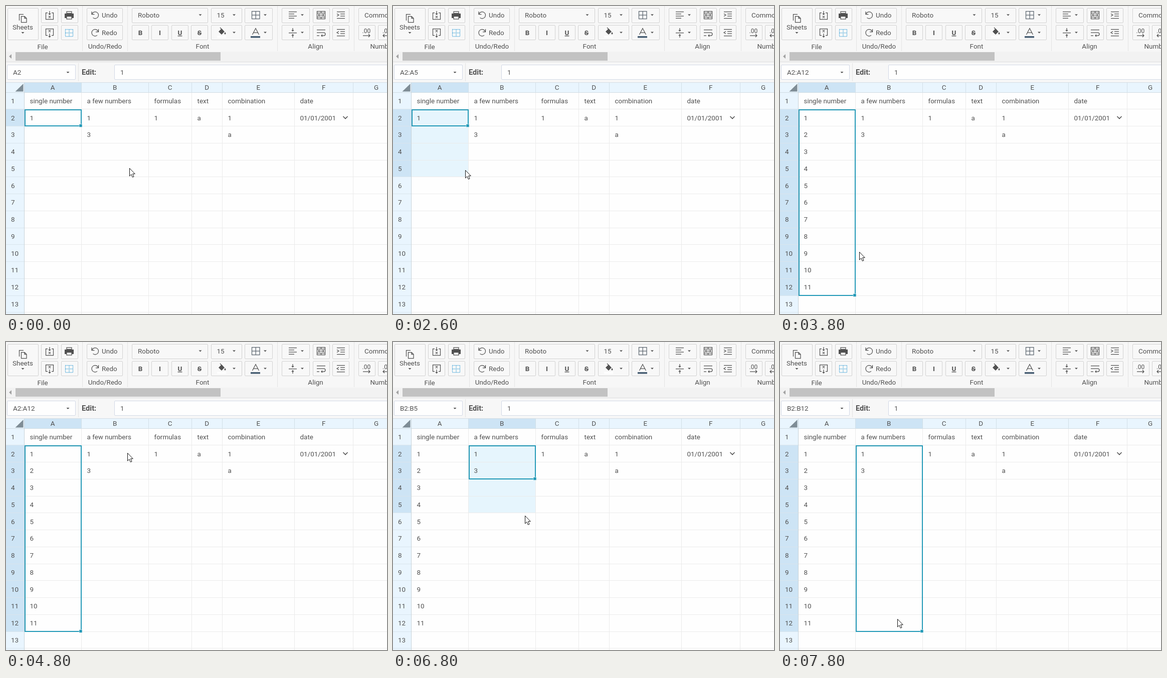
An HTML page for the animation above (8 s loop, 760 by 614 pixels).

```html
<!DOCTYPE html>
<html lang="en">
<head>
<meta charset="utf-8">
<title>Spreadsheet autofill</title>
<style>
html, body { margin: 0; width: 100%; height: 100%; overflow: hidden; background: #fefefe; }
svg { display: block; width: 760px; height: 614px; }
text { font: 13.45px Roboto, sans-serif; fill: #515151; white-space: pre; }
.mid { text-anchor: middle; }
.bold { font-weight: 600; }
.icon { fill: none; stroke: #505050; stroke-width: 1.25; }
.solid { fill: #505050; stroke: none; }
</style>
</head>
<body>
<svg id="stage" viewBox="0 0 760 614"></svg>
<script>
const STEP = 200, STEPS = 40;
const COLS = [36.5, 150.5, 284.5, 370.5, 431.5, 575.5, 692.5, 785.5];
const TOP = 172.5, PITCH = 33.75;
const rowY = row => Math.round(TOP + (row - 1) * PITCH);
const baseline = row => TOP + (row - 0.5) * PITCH + 4.6;
const TEAL = '#2299b7', HEAD = '#e9f5fe', HEAD_ON = '#cde4f5', SELECTED = '#e6f5fd';

const rect = (x, y, w, h, fill, extra = '') =>
  `<rect x="${x}" y="${y}" width="${w}" height="${h}" fill="${fill}" ${extra}/>`;
const text = (x, y, str, cls = '', extra = '') =>
  `<text x="${x}" y="${y}" class="${cls}" ${extra}>${str}</text>`;
const icon = (d, cls = 'icon', extra = '') => `<path d="${d}" class="${cls}" ${extra}/>`;
const line = (x1, y1, x2, y2, color) =>
  `<path d="M${x1} ${y1}L${x2} ${y2}" stroke="${color}" fill="none"/>`;
const caret = (x, y) => icon(`M${x - 3} ${y - 1.5}h6l-3 3z`, 'solid');
const button = (x, y, w, h = 29) =>
  rect(x + .5, y + .5, w, h, '#f8f8f8', 'rx="1.5" stroke="#d2d2d2"');
const field = (x, w) => rect(x + .5, 117.5, w, 29, '#fefefe', 'rx="1.5" stroke="#d2d9e6"');

function toolbar() {
  const undo = 'M171 11v5.5h5.5M171.5 16.2A6.7 6.7 0 1 1 173.5 23.4';
  const bars = (x, y, lengths) => lengths.map((n, i) => `M${x} ${y + i * 4.3}h${n}`).join('');
  const indent = y => `M660 ${y}h16M667 ${y + 4.3}h9M667 ${y + 8.6}h9M660 ${y + 13}h16`;
  const pairs = [70, 110, 612, 651].map(x => button(x, 4, 33) + button(x, 38, 33)).join('');
  const letters = [['B', 251], ['I', 290], ['U', 330], ['S', 369]];
  const letterStyle = {
    B: '', I: 'font-style="italic"',
    U: 'text-decoration="underline"', S: 'text-decoration="line-through"'
  };
  return rect(0, 0, 760, 91, '#f7f7f7') +
    [152.5, 242.5, 541.5, 694.5].map(x => line(x, 0, x, 90, '#e4e4e4')).join('') +
    button(3, 4, 61, 63) + pairs +
    button(161, 4, 71) + button(161, 38, 71) + button(251, 4, 151) +
    [4, 38].map(y => button(409, y, 61) + button(476, y, 55) + button(550, y, 55)).join('') +
    button(703, 4, 80) + button(703, 38, 33) + button(742, 38, 33) +

    icon('M26.5 29V16.5H35M30.5 20.5h6.5l4 4v8h-10.5zM37 20.5v4h4') +
    text(33.5, 47, 'Sheets', 'mid') + caret(33.5, 53.5) +
    icon('M83 13.5h-3.5v13h15v-13h-3.5M87 10v7M85 15l2 2 2-2M85 20l4 4m0-4l-4 4') +
    icon('M83 58.5h-3.5v-13h15v13h-3.5M87 55v7M85 60l2 2 2-2M85 48l4 4m0-4l-4 4') +
    icon('M121 11h10v3.5h-10z') + icon('M117 15h18v9h-18z', 'solid') +
    icon('M121 20.5h10v5.5h-10z', 'icon', 'style="fill:#f8f8f8"') +
    icon('M118.5 46.5h15v14h-15zM126 46.5v14M118.5 53.5h15', 'icon',
      'style="stroke:#58aedb" stroke-dasharray="2 1"') +

    icon(undo) + icon(undo, 'icon', 'transform="translate(355.5 35) scale(-1 1)"') +
    text(191, 22.5, 'Undo') + text(191, 57.5, 'Redo') +
    text(263, 23, 'Roboto') + text(420.5, 23, '15') +
    [[387.5, 18], [455, 18], [517, 18], [591, 18], [455, 53], [517, 53], [591, 53]]
      .map(p => caret(...p)).join('') +
    letters.map(([c, x]) => button(x, 38, 33) +
      text(x + 17, 58, c, 'mid bold', letterStyle[c])).join('') +

    icon('M490.5 10.5h15.5v15h-15.5zM498.2 10.5v15M490.5 18h15.5', 'icon',
      'style="stroke:#5c6670"') +
    icon('M424 51l6-6 6 6-6 6zM427 43l3 3M437 52q3 4 0 4.5-3-.5 0-4.5', 'solid') +
    icon('M427 43l5 5') + rect(421, 59.5, 18, 4, '#fefefe') +
    icon('M491.5 57L498 44.5 504.500 57M494 53h8') + rect(488, 60, 19, 3.5, '#4a6075') +

    icon(bars(564, 11.5, [16, 11, 16, 11])) +
    icon('M564 53.500h16M572 44v6M570 48l2 2 2-2M572 63v-6M570 59l2-2 2 2') +
    icon('M620.5 10.500h16v15h-16zM620.5 14h16M628.500 10.500v3.500M620.5 22h16M628.500 22v3.500' +
      'M623 18h11M625 16l-2 2 2 2M632 16l2 2-2 2') +
    icon('M620 47.500h17M620 53h14q3 0 3 3t-3 3h-5M631 57l-2 2 2 2M620 59h5') +
    icon(indent(11.5) + 'M660 15.500l4 2.500-4 2.500') +
    icon(indent(46.5) + 'M664 50.500l-4 2.500 4 2.500') +
    text(715, 23, 'Common') +
    text(710.5, 53.5, '.00', '', 'style="font-size:12px"') +
    text(751, 53.5, '.00', '', 'style="font-size:12px"') +
    icon('M712 59h14M723 56l3 3-3 3') + icon('M766 59h-14M755 56l-3 3 3 3') +

    [[73, 'File', 86], [197.5, 'Undo/Redo', 85], [392, 'Font', 85], [617.5, 'Align', 85]]
      .map(([x, s, y]) => text(x, y, s, 'mid')).join('') +
    text(726.5, 85, 'Number');
}

function editBar() {
  return rect(0, 91, 760, 20, '#f2f2f2') + rect(19, 92, 409, 17, '#c2c2c2') +
    icon('M6 100.5l5-4.500v9z', 'solid', 'style="fill:#a2a2a2"') +
    rect(0, 111, 760, 41, '#f7f7f7') + line(0, 111.5, 760, 111.5, '#dedede') +
    field(2, 136) + caret(123.5, 132.5) + line(144.5, 114, 144.5, 150, '#e2e2e2') +
    text(151, 137, 'Edit:', 'bold', 'style="font-size:14.6px"') +
    field(216, 560) + text(228, 137, '1');
}

function grid() {
  let out = line(0, 152.5, 760, 152.5, '#d5dde3') + line(0, 172.5, 760, 172.5, '#d0dce3');
  for (let row = 2; row <= 14; row++) {
    const y = rowY(row) - .5;
    out += line(0, y, 36, y, '#d9e5ed') + line(37, y, 760, y, '#ebebeb');
  }
  COLS.slice(1, 7).forEach(x => {
    out += line(x, 153, x, 173, '#d2dfe7') + line(x, 173, x, 614, '#ebebeb');
  });
  return out + line(36.5, 153, 36.5, 614, '#c8d3da') +
    icon('M34.500 155v15.500h-16z', 'solid', 'style="fill:#7f8d96"');
}

function labels() {
  const cell = (col, row, str) => text(COLS[col] + 11, baseline(row), str);
  let out = [...'ABCDEFG'].map((c, i) =>
    text((COLS[i] + COLS[i + 1]) / 2 - .3, 167, c, 'mid')).join('');
  for (let row = 1; row <= 13; row++) out += text(10, baseline(row), row);
  ['single number', 'a few numbers', 'formulas', 'text', 'combination', 'date']
    .forEach((s, col) => out += cell(col, 1, s));
  ['1', '1', '1', 'a', '1', '01/01/2001'].forEach((s, col) => out += cell(col, 2, s));
  out += cell(1, 3, '3') + cell(4, 3, 'a') + icon('M672.500 220l4.500 4.500 4.500-4.500', 'icon', 'style="stroke-width:1.6"');
  let filled = '';
  for (let row = 3; row <= 12; row++) filled += cell(0, row, row - 1);
  return out + `<g id="filled">${filled}</g>`;
}

const ARROW = 'M.5 .5V16L4 12.700 6.300 18.300 9 17.200 6.700 11.700H11.300Z';

const stage = document.getElementById('stage');
stage.innerHTML = rect(0, 0, 760, 614, '#fefefe') + toolbar() + editBar() +
  rect(0, 152, 760, 21, HEAD) + rect(0, 173, 36, 441, HEAD) +
  rect(0, 153, 0, 20, HEAD_ON, 'id="colOn"') +
  rect(0, rowY(2), 36, 0, HEAD_ON, 'id="rowOn"') +
  rect(0, rowY(2), 0, 0, SELECTED, 'id="range"') +
  grid() + labels() + text(14, 137, '', '', 'id="name"') +
  rect(0, 207, 0, 0, 'none', `id="outline" stroke="${TEAL}" stroke-width="2"`) +
  rect(0, 0, 6, 6, TEAL, 'id="handle"') +
  `<g id="pointer"><path id="arrow" d="${ARROW}" fill="#fff" stroke="#111"/>` +
  '<path id="cross" d="M-12 0H12M0 -12V12" stroke="#000" stroke-width="2.4"/></g>';

const part = Object.fromEntries([...stage.querySelectorAll('[id]')].map(e => [e.id, e]));
const set = (el, attrs) => Object.entries(attrs).forEach(([k, v]) => el.setAttribute(k, v));
const show = (el, on) => set(el, { visibility: on ? 'visible' : 'hidden' });

// [step, x, y]
const PATH = [
  [0, 246, 323], [2, 238, 313], [4, 190, 262], [6, 152, 238], [8, 148, 235], [10, 148, 236],
  [12, 146, 273], [14, 142, 380], [16, 135, 528], [17, 131, 555], [18, 136, 550],
  [20, 180, 430], [23, 238, 240], [24, 242, 221], [25, 242, 221], [26, 243, 228],
  [28, 246, 251], [29, 262, 262], [30, 282, 271], [31, 282, 272], [32, 281, 288],
  [34, 263, 346], [37, 240, 532], [38, 235, 553], [39, 234, 552]
];

// col/last: active range; box: outlined column and last row; no last means dragging
const PHASES = [
  { from: 0, col: 0, last: 2, box: [0, 2] },
  { from: 11, col: 0, box: [0, 2] },
  { from: 18, col: 0, last: 12, box: [0, 12] },
  { from: 19, col: 0, last: 12, box: [0, 12], filled: true },
  { from: 26, col: 1, box: [0, 12], filled: true },
  { from: 29, col: 1, last: 3, box: [1, 3], filled: true },
  { from: 32, col: 1, box: [1, 3], filled: true },
  { from: 39, col: 1, last: 12, box: [1, 12], filled: true }
];

function pointerAt(step) {
  const i = PATH.findLastIndex(p => p[0] <= step);
  const [s0, x0, y0] = PATH[i], [s1, x1, y1] = PATH[i + 1] || [s0 + 1, x0, y0];
  const k = (step - s0) / (s1 - s0);
  return [Math.round(x0 + (x1 - x0) * k), Math.round(y0 + (y1 - y0) * k)];
}

function draw(step) {
  const [x, y] = pointerAt(step);
  const { col, last, box: [boxCol, boxLast], filled } = PHASES.findLast(p => p.from <= step);
  const dragRow = Math.floor((y - 8 - TOP) / PITCH) + 1;
  const end = last || Math.min(12, Math.max(2, dragRow));
  const left = COLS[col] + .5, width = COLS[col + 1] - COLS[col];
  const height = rowY(end + 1) - rowY(2);
  const letter = 'AB'[col];

  part.name.textContent = `${letter}2` + (end > 2 ? `:${letter}${end}` : '');
  set(part.colOn, { x: left, width });
  set(part.rowOn, { height });
  set(part.range, { x: left, width, height });
  show(part.range, !last);
  show(part.filled, filled);

  const right = COLS[boxCol + 1] - .5, bottom = rowY(boxLast + 1) - 1;
  const boxLeft = COLS[boxCol] + 1.5;
  set(part.outline, { x: boxLeft, width: right - boxLeft, height: bottom - 207 });
  set(part.handle, { x: right - 4, y: bottom - 3.5 });
  set(part.handle, { stroke: '#fefefe', 'stroke-width': .6 });

  const cross = step >= 6 && step <= 10 || step === 30 || step === 31;
  show(part.cross, cross);
  show(part.arrow, !cross);
  set(part.pointer, { transform: `translate(${x} ${y})` });
}

let shown = -1;
function tick() {
  const step = Math.floor(performance.now() / STEP) % STEPS;
  if (step !== shown) draw(shown = step);
  requestAnimationFrame(tick);
}
tick();
</script>
</body>
</html>
```
